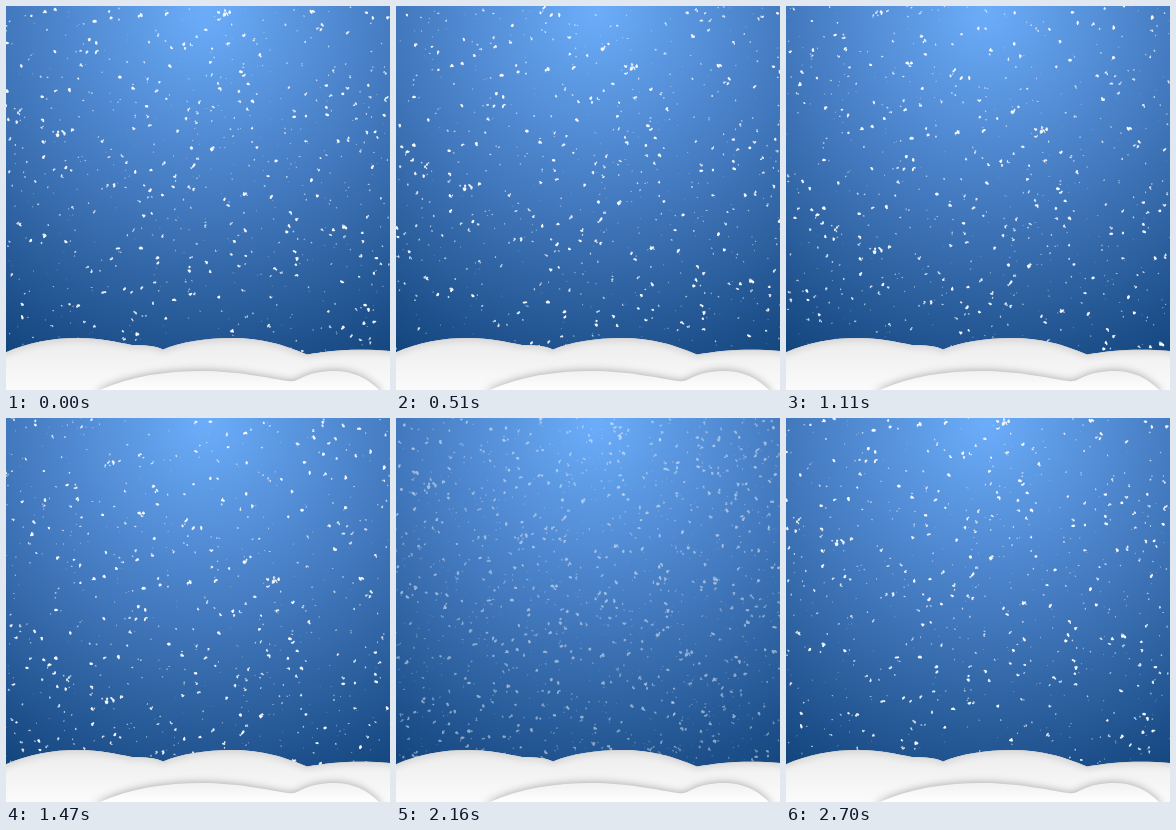
Animation of 384x384 px, one loop 2.73 s. Source, as an HTML page with a canvas:

```html
<!DOCTYPE html>
<html lang="en">
<head>
<meta charset="utf-8">
<title>Snowfall</title>
<style>
  html, body { margin: 0; width: 100%; height: 100%; overflow: hidden; background: #174a84; }
  canvas { display: block; width: 384px; height: 384px; }
</style>
</head>
<body>
<canvas id="stage" width="384" height="384"></canvas>
<script>
const SIZE = 384, STEP = 30, STEPS = 91;
const DRIFT = 1, FALL = 3.17;            // pixels per step
const FADE_START = 62, FADE_END = 82;    // the sheet dissolves into its own restart
const SHEET = { x: -95, y: -295, w: 515, h: 735 };
const FLAKES = 2100;

const ctx = document.getElementById('stage').getContext('2d');

function layer(w, h, paint) {
  const canvas = document.createElement('canvas');
  canvas.width = w;
  canvas.height = h;
  paint(canvas.getContext('2d'));
  return canvas;
}

function seeded(seed) {
  return () => {
    seed = (seed + 0x6D2B79F5) | 0;
    let v = Math.imul(seed ^ (seed >>> 15), 1 | seed);
    v = (v + Math.imul(v ^ (v >>> 7), 61 | v)) ^ v;
    return ((v ^ (v >>> 14)) >>> 0) / 4294967296;
  };
}

function addStops(gradient, stops) {
  stops.forEach(([at, color]) => gradient.addColorStop(at, color));
  return gradient;
}

const sky = layer(SIZE, SIZE, c => {
  c.fillStyle = addStops(c.createRadialGradient(200, 4, 0, 200, 4, 390), [
    [0, 'rgb(108,173,250)'], [0.5, 'rgb(67,121,190)'], [1, 'rgb(20,70,126)']
  ]);
  c.fillRect(0, 0, SIZE, SIZE);
});

const snow = layer(SHEET.w, SHEET.h, c => {
  const rand = seeded(417);
  const spread = range => (rand() - 0.5) * range;

  const speck = (x, y, r, alpha) => {
    c.globalAlpha = alpha;
    c.beginPath();
    c.ellipse(x, y, r * (1 + rand() * 0.4), r * (0.65 + rand() * 0.3), rand() * Math.PI, 0, 7);
    c.fill();
  };

  // Large flakes get a second lobe, which makes them ragged.
  const flake = (x, y, size) => {
    const r = 0.5 + 1.05 * size * size, alpha = 0.25 + 0.7 * size;
    speck(x, y, r, alpha);
    if (size > 0.7) speck(x + spread(3.5), y + spread(3.5), r * 0.7, alpha);
  };

  c.fillStyle = '#fff';
  for (let i = 0; i < FLAKES; i++) {
    flake(rand() * SHEET.w, rand() * SHEET.h, Math.pow(rand(), 0.85));
  }

  const cluster = (x, y, width, height, count) => {
    for (let i = 0; i < count; i++) {
      flake(x - SHEET.x + spread(width), y - SHEET.y + spread(height), 0.8);
    }
  };
  cluster(55, 128, 7, 6, 5);
  cluster(203, 142, 9, 4, 5);
  cluster(240, 188, 8, 1, 4);
  cluster(12, 218, 5, 2, 3);
  cluster(219, 7, 5, 6, 4);
  cluster(87, -58, 7, 5, 4);
});

const hills = layer(SIZE, SIZE, c => {
  const vertical = (top, bottom, from, to) =>
    addStops(c.createLinearGradient(0, top, 0, bottom), [[0, from], [1, to]]);

  // A shaded rim lies just inside the outline.
  const back = new Path2D('M-10 351 C15 338 42 332 72 332 C96 332 110 336 126 339 ' +
    'C140 339 150 340 157 343.5 C175 336 200 332 225 332 C257 332 278 339 301 348.5 ' +
    'C326 344 357 341.5 394 346 V400 H-10 Z');
  c.save();
  c.fillStyle = vertical(332, 384, '#ececec', '#fbfbfb');
  c.fill(back);
  c.clip(back);
  c.shadowColor = 'rgba(0,0,0,.4)';
  c.shadowBlur = 7;
  c.strokeStyle = '#d6d6d6';
  c.lineWidth = 1.5;
  c.stroke(back);
  c.restore();

  c.shadowColor = 'rgba(0,0,0,.36)';
  c.shadowBlur = 9;
  c.fillStyle = vertical(364, 384, '#f0f0f0', '#ffffff');
  c.fill(new Path2D('M88 387 C119 371 157 365 196 365 C231 365 262 372 282 375 ' +
    'Q288 376 293 373 C304 367 316 365 328 365 C350 365 364 374 377 388 Z'));
});

function drawSnow(step, alpha) {
  if (alpha <= 0) return;
  ctx.globalAlpha = alpha;
  ctx.drawImage(snow, SHEET.x + step * DRIFT, Math.round(SHEET.y + step * FALL));
  ctx.globalAlpha = 1;
}

const start = performance.now();

function render() {
  const elapsed = Math.max(0, performance.now() - start);
  const step = Math.floor(elapsed / STEP) % STEPS;
  const mix = Math.min(1, Math.max(0, (step - FADE_START) / (FADE_END - FADE_START)));
  ctx.drawImage(sky, 0, 0);
  drawSnow(step, 1 - mix);
  drawSnow(step - STEPS, mix);
  ctx.drawImage(hills, 0, 0);
  requestAnimationFrame(render);
}
render();
</script>
</body>
</html>
```
